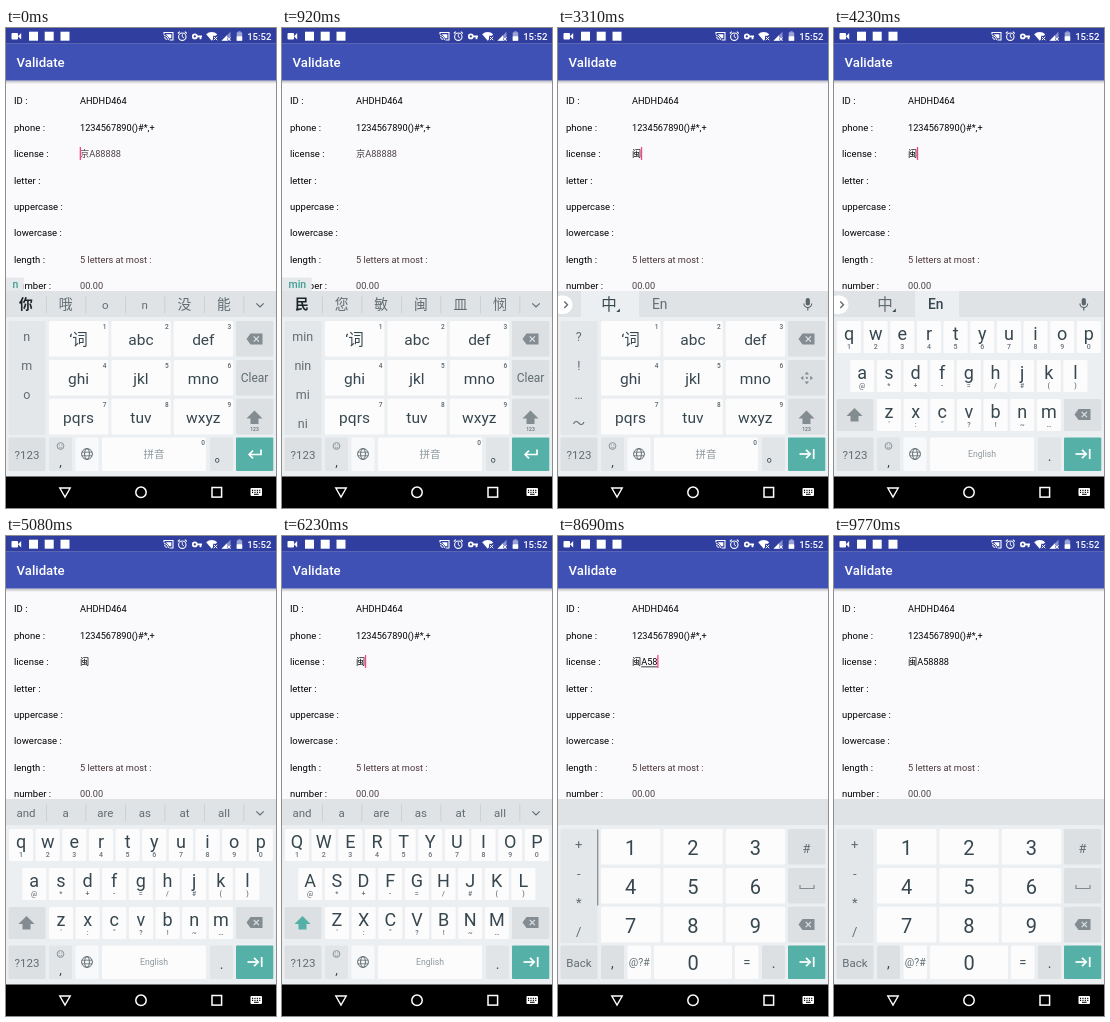
Animation, 270 px wide and 480 px high, one loop 9850 ms. Source, as an HTML page with a canvas:

```html
<!DOCTYPE html>
<html lang="en">
<head>
<meta charset="utf-8">
<title>Validate</title>
<style>
html, body { margin: 0; width: 100%; height: 100%; overflow: hidden; background: #000; }
canvas { display: block; width: 270px; height: 480px; }
</style>
</head>
<body>
<canvas id="stage"></canvas>
<script>
const LOOP = 9850;
const canvas = document.getElementById('stage');
const ctx = canvas.getContext('2d');
const dpr = window.devicePixelRatio || 1;
canvas.width = 270 * dpr;
canvas.height = 480 * dpr;

const FONT = 'Roboto, "Noto Sans CJK SC", "Noto Sans CJK", sans-serif';
const C = {
  bg: '#faf9fb', strip: '#e0e3e5', board: '#eceff1', key: '#fcfcfd', gray: '#dce0e3', side: '#e4e7e9',
  press: '#cfd5d9', ink: '#37474f', soft: '#616c72', icon: '#828c91', teal: '#55b1a7', pink: '#ff4081'
};

// Last entry whose start time has been reached.
const at = (t, steps) => steps.filter(s => s[0] <= t).pop()[1];
const within = (t, a, b) => t >= a && t < b;

function rect(x, y, w, h, fill, r = 0) {
  ctx.fillStyle = fill;
  ctx.beginPath();
  ctx.roundRect(x, y, w, h, r);
  ctx.fill();
}

function text(s, x, base, size, fill, align = 'left', weight = 400) {
  ctx.font = `${weight} ${size}px ${FONT}`;
  ctx.textAlign = align;
  ctx.fillStyle = fill;
  ctx.fillText(s, x, base);
}

const label = (s, x, y, size, fill = C.ink, weight = 400) =>
  text(s, x, y + size * 0.36, size, fill, 'center', weight);

function path(points, color, width = 0, close = false) {
  ctx.beginPath();
  points.forEach(([x, y], i) => i ? ctx.lineTo(x, y) : ctx.moveTo(x, y));
  if (close || !width) ctx.closePath();
  if (width) {
    ctx.strokeStyle = color;
    ctx.lineWidth = width;
    ctx.stroke();
  } else {
    ctx.fillStyle = color;
    ctx.fill();
  }
}

function arc(x, y, r, color, width, a = 0, b = Math.PI * 2) {
  ctx.strokeStyle = color;
  ctx.lineWidth = width;
  ctx.beginPath();
  ctx.arc(x, y, r, a, b);
  ctx.stroke();
}

function cross(x, y, r, color, width) {
  path([[x - r, y - r], [x + r, y + r]], color, width);
  path([[x + r, y - r], [x - r, y + r]], color, width);
}

function statusBar() {
  rect(0, 0, 270, 15.75, '#303f9f');
  rect(5.5, 5, 6.5, 6.5, '#fff', 1);
  path([[12, 8.2], [15.2, 5], [15.2, 11.5]], '#fff');
  for (const x of [23, 38.7, 54.5]) rect(x, 3.7, 9, 9, '#fff');

  path([[158, 6.5], [158, 4.5], [167, 4.5], [167, 12], [163.5, 12]], '#fff', 1.1);
  path([[159.8, 6.2], [165.3, 6.2], [165.3, 10.2], [163.5, 10.2]], '#fff');
  arc(158, 12, 2.4, '#fff', 1, -Math.PI / 2, 0);
  arc(158, 12, 4.4, '#fff', 1, -Math.PI / 2, 0);
  arc(176.3, 8.7, 3.7, '#fff', 1.1);
  path([[176.3, 6.2], [176.3, 8.9], [178.1, 10]], '#fff', 0.9);
  path([[171.8, 5.5], [173.8, 3.7]], '#fff', 1.1);
  path([[178.8, 3.7], [180.8, 5.5]], '#fff', 1.1);
  arc(188.8, 8.4, 2, '#fff', 1.7);
  path([[191, 8.4], [196, 8.4]], '#fff', 1.8);
  path([[194.5, 8.4], [194.5, 11.2]], '#fff', 1.8);
  path([[200.2, 6.2], [202.7, 4.5], [205.7, 4], [208.7, 4.5], [211.2, 6.2], [205.7, 12.8]], '#fff');
  rect(207, 7.8, 5, 5.2, '#303f9f');
  cross(209.5, 10.5, 1.7, '#fff', 1);
  path([[215.5, 12.8], [224.5, 12.8], [224.5, 3.8]], '#8b94cc');
  path([[215.5, 12.8], [221, 12.8], [221, 7.3]], '#fff');
  cross(223, 11, 1.6, '#fff', 0.9);
  rect(230.7, 4.3, 5.5, 8.5, '#9da5d6', 0.6);
  rect(232.2, 3.3, 2.5, 1.5, '#9da5d6');
  rect(230.7, 8.3, 5.5, 4.5, '#fff', 0.6);
  text('15:52', 265.5, 12, 9.6, '#fff', 'right', 500);
}

function form(t) {
  rect(0, 0, 270, 264, C.bg);
  ['ID', 'phone', 'license', 'letter', 'uppercase', 'lowercase', 'length', 'number']
    .forEach((s, i) => text(s + ' :', 8, 76.2 + i * 26.45, 9.5, '#000'));
  text('AHDHD464', 74, 76.2, 9.2, '#000');
  text('1234567890()#*,+', 74, 102.6, 9.2, '#000');
  text('5 letters at most :', 74, 234.9, 9.2, '#4a3638');
  text('00.00', 74, 261.4, 9.2, '#4a4042');

  const value = at(t, [[0, ''], [1150, '闽'], [6460, '闽A'], [8230, '闽A5'], [8690, '闽A58'],
    [8850, '闽A588'], [9080, '闽A5888'], [9270, '闽A58888']]);
  text(value || '京A88888', 74, 129.1, 9.2, value ? '#000' : '#4a4042');
  const width = ctx.measureText(value).width;
  if (value.length > 1 && t < 9270) {
    const start = ctx.measureText('闽').width;
    rect(74 + start, 130.4, width - start, 0.9, '#222');
  }
  const cursor = at(t, [[0, 1], [540, 0], [1000, 1], [1690, 0], [2230, 1], [2690, 0], [3160, 1],
    [3770, 0], [4230, 1], [4690, 0], [5150, 1], [5620, 0], [6080, 1], [6920, 0], [7450, 1],
    [7920, 0], [8230, 1], [9770, 0]]);
  if (cursor) rect(73.7 + width, 119, 1.3, 13, C.pink);
}

function appBar() {
  const shade = ctx.createLinearGradient(0, 52.5, 0, 56);
  shade.addColorStop(0, 'rgba(0,0,0,.25)');
  shade.addColorStop(1, 'rgba(0,0,0,0)');
  rect(0, 52.5, 270, 3.5, shade);
  rect(0, 15.75, 270, 36.75, '#3f51b5');
  text('Validate', 10.5, 39.3, 13.2, '#fff', 'left', 500);
}

function navBar() {
  rect(0, 448.5, 270, 31.5, '#000');
  path([[53.8, 460], [64.2, 460], [59, 469]], '#fff', 1.4, true);
  arc(135, 464.3, 5.2, '#fff', 1.5);
  ctx.strokeRect(206, 459.5, 9.6, 9.6);
  rect(244.5, 460, 11.5, 8, '#fff', 1);
  for (let i = 0; i < 8; i++) rect(246 + (i % 4) * 2.4, 461.8 + (i >> 2) * 2, 1.1, 1.1, '#000');
  rect(248, 465.8, 4.6, 1, '#000');
}

function backspace(x, y) {
  path([[x - 8, y], [x - 4, y - 5.5], [x + 8, y - 5.5], [x + 8, y + 5.5], [x - 4, y + 5.5]], C.icon);
  cross(x + 1.8, y, 2.6, C.gray, 1.3);
}

function shift(x, y, color = C.icon) {
  path([[x, y - 7], [x + 8, y + 1], [x + 4, y + 1], [x + 4, y + 6.5], [x - 4, y + 6.5], [x - 4, y + 1], [x - 8, y + 1]], color);
}

function enterKey(composing) {
  rect(230, 409.5, 37.3, 33.5, C.teal, 1);
  if (composing) {
    path([[255, 421.5], [255, 426.5], [243.5, 426.5]], '#fff', 1.7);
    path([[247, 422.7], [243.2, 426.5], [247, 430.3]], '#fff', 1.7);
  } else {
    path([[241.5, 426], [252, 426]], '#fff', 1.7);
    path([[248, 421.8], [252.2, 426], [248, 430.2]], '#fff', 1.7);
    path([[255.7, 421], [255.7, 431]], '#fff', 1.7);
  }
}

function bottomRow(spaceName, size, stop, composing) {
  rect(2.5, 409.5, 37, 33.5, C.gray, 1.5);
  label('?123', 21, 426.7, 11.5, C.soft);
  for (const x of [43, 204]) rect(x, 409.5, 23, 33.5, '#e1e5e7', 1.5);
  rect(69.5, 409.5, 23, 33.5, '#f8f9fa', 1.5);
  arc(54.5, 418, 3.4, C.icon, 0.9);
  arc(54.5, 418.4, 1.7, C.icon, 0.7, 0.2, 2.9);
  rect(52.8, 416.4, 0.9, 1, C.icon);
  rect(55.3, 416.4, 0.9, 1, C.icon);
  label(',', 54.5, 433, 13);
  arc(81, 426, 5.4, C.soft, 1);
  ctx.beginPath();
  ctx.ellipse(81, 426, 2.4, 5.4, 0, 0, Math.PI * 2);
  ctx.stroke();
  for (const y of [424.2, 427.8]) path([[76, y], [86, y]], C.soft, 0.8);
  rect(96, 409.5, 104, 33.5, C.key, 1.5);
  label(spaceName, 148, 426, size, '#8f999e');
  label(stop, 215.5, 427.5, 14);
  enterKey(composing);
}

// Three by three block with the side column shared by both pads.
function pad(names, size, side, sideSize) {
  rect(2.5, 293, 37, 114, C.side, 1.5);
  side.forEach((s, i) => label(s, 20.8, 308.5 + i * 29, sideSize, C.soft));
  names.forEach((s, i) => {
    const x = 43 + (i % 3) * 62.4, y = 293 + Math.floor(i / 3) * 38.9;
    rect(x, y, 59.4, 35.6, C.key, 1.5);
    label(s, x + 29.5, y + 18.6, size);
  });
  for (let i = 0; i < 3; i++) rect(230, 293 + i * 38.9, 37.3, 35.6, C.gray, 1.5);
}

function scrollbar(x, h, alpha) {
  ctx.globalAlpha = Math.max(0, Math.min(1, alpha));
  rect(x, 293.5, 1.4, h, '#8d9498');
  ctx.globalAlpha = 1;
}

function pinyinPad(t) {
  const composing = t < 1150;
  const side = at(t, [[0, ['n', 'm', 'o']], [310, ['ni', 'mi', 'n', 'm']],
    [690, ['min', 'nin', 'mi', 'ni']], [1150, ['?', '!', '…', '～']]]);
  pad(['‘词', 'abc', 'def', 'ghi', 'jkl', 'mno', 'pqrs', 'tuv', 'wxyz'], 15.5, side, 12.5);
  for (let i = 0; i < 9; i++)
    label(i + 1, 98.5 + (i % 3) * 62.4, 299 + Math.floor(i / 3) * 38.9, 6.5, '#59656b', 500);
  backspace(248.5, 311);
  if (composing) label('Clear', 248.5, 350, 12, C.soft);
  else {
    rect(247.7, 348.8, 2.2, 2.2, C.icon, 1);
    for (let i = 0; i < 4; i++) {
      ctx.save();
      ctx.translate(248.8, 350);
      ctx.rotate(i * Math.PI / 2);
      path([[-2.2, -3.4], [2.2, -3.4], [0, -6.2]], C.icon);
      ctx.restore();
    }
  }
  shift(248.5, 389.5);
  label('123', 248.5, 401, 5, C.soft, 500);
  bottomRow('拼音', 10.5, '。', composing);
  label('0', 197, 415, 6.5, '#59656b', 500);
  if (!composing) scrollbar(40, 43, (2330 - t) / 250);
}

function letterPad(t) {
  const upper = within(t, 5690, 6540);
  const rows = [
    ['qwertyuiop', '1234567890', 15, 293],
    ['asdfghjkl', '@*+-=/#()', 28.2, 332],
    ['zxcvbnm', '\':"?!~…', 55, 371]
  ];
  for (const [letters, subs, x0, y] of rows) {
    [...letters].forEach((c, i) => {
      const x = x0 + i * 26.65;
      const down = c === 'a' && within(t, 6460, 6690);
      rect(x - 12, y, 24, 32, down ? C.press : C.key, 1.5);
      label(upper ? c.toUpperCase() : c, x, y + 12.3, 18);
      label(subs[i], x, y + 25.5, 7, '#66727a', 500);
    });
  }
  rect(2.5, 371, 37, 32, within(t, 5620, 5700) ? C.press : C.gray, 1.5);
  shift(20.5, 387, upper ? C.teal : C.icon);
  rect(230, 371, 37.3, 32, C.gray, 1.5);
  backspace(248.5, 386.5);
  bottomRow('English', 8.7, '.', false);
  if (within(t, 7460, 7620)) {
    rect(2.5, 409.5, 37, 33.5, C.press, 1.5);
    label('?123', 21, 426.7, 11.5, C.soft);
  }
}

function numberPad(t) {
  pad([...'123456789'], 20, ['+', '-', '*', '/'], 13);
  label('#', 248.5, 312, 13, C.soft);
  path([[242, 349], [242, 352.5], [256, 352.5], [256, 349]], C.icon, 1.2);
  backspace(248.5, 388.5);
  const keys = [['Back', 2.5, 37, C.gray, 11.5], [',', 43, 23, C.gray, 14], ['@?#', 69.5, 23.5, C.key, 10.5],
    ['0', 96, 78, C.key, 20], ['=', 177, 23.5, C.key, 13], ['.', 204, 23, C.gray, 14]];
  for (const [s, x, w, fill, size] of keys) {
    rect(x, 409.5, w, 33.5, fill, 1.5);
    label(s, x + w / 2, 426.7, size, s.length > 1 ? C.soft : C.ink);
  }
  enterKey(false);
  scrollbar(39, 76, (9020 - t) / 250);
}

function candidates(words, firstDark) {
  words.forEach((s, i) => {
    const cjk = s.charCodeAt(0) > 255, x = 20 + i * 39.6;
    const dark = firstDark && i === 0;
    label(s, x, cjk ? 276.4 : 277, cjk ? 13.8 : 11.5, dark ? '#1c2529' : C.soft, dark ? 700 : 400);
    rect(40 + i * 39.5, 268.5, 0.7, 17, '#c3c9cc');
  });
  path([[250.3, 275.3], [254, 279], [257.7, 275.3]], C.soft, 1.2);
}

function toolbar(english) {
  rect(english ? 81 : 23, 263, english ? 44 : 58, 26, C.board);
  rect(-6, 267.5, 20.5, 18.5, '#fff', 9);
  path([[6.3, 273.5], [9.5, 276.7], [6.3, 280]], C.soft, 1.4);
  label('中', 51, 276.5, 15.5, english ? C.soft : C.ink, english ? 400 : 500);
  path([[61.8, 280.5], [61.8, 284], [58.3, 284]], C.ink);
  label('En', 101.7, 276.4, 13.8, english ? C.ink : C.soft, english ? 500 : 400);
  rect(247.7, 270, 4.2, 7.5, '#59656b', 2.1);
  arc(249.8, 275.6, 3.9, '#59656b', 1.1, 0, Math.PI);
  path([[249.8, 279.5], [249.8, 282.5]], '#59656b', 1.2);
}

function strip(t) {
  rect(0, 263, 270, 26, C.strip);
  if (within(t, 3160, 4840)) return toolbar(t >= 3930);
  if (t >= 7620) return;
  const words = at(t, [[0, '你 哦 o n 没 能'], [310, '你 米 迷 泥 密 逆'], [690, '民 您 敏 闽 皿 悯'],
    [1150, '南语 南 台 江 侯 南话'], [4840, 'and a are as at all'], [6690, 'And A Are As At All']]);
  candidates(words.split(' '), t < 1150);
}

function keyboard(t) {
  rect(0, 263, 270, 186, C.board);
  strip(t);
  if (t < 3930) pinyinPad(t);
  else if (t < 7620) letterPad(t);
  else numberPad(t);
  if (t < 1150) {
    const typed = at(t, [[0, 'n'], [310, 'ni'], [690, 'min']]);
    ctx.font = `500 10.5px ${FONT}`;
    const w = ctx.measureText(typed).width + 12;
    rect(0, 249.5, w, 13.5, '#e5e9eb');
    text(typed, 6.5, 260.3, 10.5, '#3f9d92', 'left', 500);
  }
}

function draw(now) {
  const t = now % LOOP;
  ctx.setTransform(dpr, 0, 0, dpr, 0, 0);
  form(t);
  statusBar();
  appBar();
  keyboard(t);
  navBar();
}

const start = performance.now();
function tick() {
  draw(performance.now() - start);
  requestAnimationFrame(tick);
}
tick();
</script>
</body>
</html>
```
